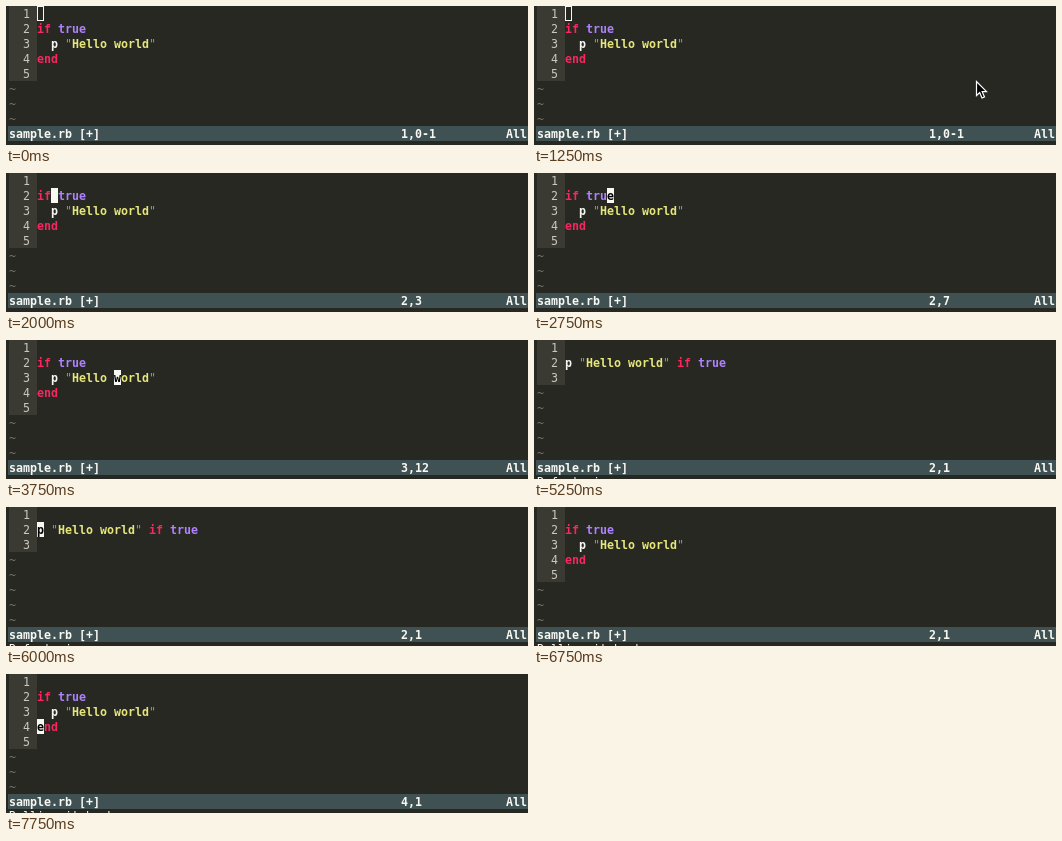
Animation of 522x139 px, one loop 8 s. Source, as an HTML page with a canvas:

```html
<!DOCTYPE html>
<html lang="en">
<head>
<meta charset="utf-8">
<title>Editor</title>
<style>
html, body { margin: 0; width: 100%; height: 100%; overflow: hidden; background: #272822; }
canvas { display: block; }
</style>
</head>
<body>
<canvas id="stage" width="522" height="139"></canvas>
<script>
const ctx = document.getElementById("stage").getContext("2d");
const LOOP = 8000, CELL = 7, ROW = 15, LEFT = 3, GUTTER = 4;
const BG = "#272822", WHITE = "#f8f8f2", PINK = "#f92660", PURPLE = "#ae81ff",
      YELLOW = "#e6e67a", GREY = "#98978c", DIM = "#74746a";

// Each line is a list of [text, colour, regular weight]
const string = [['"', GREY, true], ["Hello world", YELLOW], ['"', GREY, true]];
const block = [
  [],
  [["if", PINK], [" true", PURPLE]],
  [["  p ", WHITE], ...string],
  [["end", PINK]],
  []
];
const modifier = [
  [],
  [["p ", WHITE], ...string, [" if", PINK], [" true", PURPLE]],
  []
];

// Cursor steps: [start, line, column, style]
const steps = [
  [0, 1, 0, "hollow"], [1500, 1, 0], [1750, 2, 1], [2000, 2, 3], [2250, 2, 5],
  [2500, 2, 6], [2750, 2, 7], [3000, 3, 7], [3250, 3, 9], [3500, 3, 11],
  [3750, 3, 12], [4250, 3, 7], [4500, 2, 1], [5250, 2, 1, "off"], [5500, 2, 1],
  [6750, 2, 1, "off"], [7000, 2, 1], [7500, 3, 1], [7750, 4, 1]
];
const CONVERT = 4750, UNDO = 6250;

function rect(x, y, w, h, color) {
  ctx.fillStyle = color;
  ctx.fillRect(x, y, w, h);
}

function write(text, col, row, color, regular) {
  ctx.font = `${regular ? "" : "bold "}11.63px "DejaVu Sans Mono", monospace`;
  ctx.fillStyle = color;
  [...text].forEach((c, i) => ctx.fillText(c, LEFT + (col + i) * CELL, row * ROW + 12));
}

function drawLine(tokens, row) {
  write(String(row + 1).padStart(3), 0, row, "#c8c8bc", true);
  let col = GUTTER;
  for (const [text, color, regular] of tokens) {
    write(text, col, row, color, regular);
    col += text.length;
  }
}

function drawCursor(lines, line, column, style) {
  if (style === "off") return;
  const col = Math.max(column - 1, 0), row = line - 1;
  const x = LEFT + (GUTTER + col) * CELL, y = row * ROW;
  if (style === "hollow") {
    ctx.strokeStyle = WHITE;
    ctx.lineWidth = 1;
    ctx.strokeRect(x + 0.5, y + 0.5, CELL - 1, ROW - 1);
    return;
  }
  rect(x, y, CELL, ROW, WHITE);
  const text = lines[row].map(token => token[0]).join("");
  write(text[col] || "", GUTTER + col, row, "#000");
}

function drawPointer(time) {
  if (time < 1000 || time >= 1500) return;
  const away = Math.max(0, 1 - (time - 1000) / 250);
  ctx.save();
  ctx.translate(442.5 + 28 * away, 75.5 + 40 * away);
  const arrow = new Path2D("M0 0V14L3.2 11L5.5 16.5L8 15.4L5.7 10.2H10Z");
  ctx.fillStyle = "#000";
  ctx.strokeStyle = "#fff";
  ctx.lineWidth = 1.2;
  ctx.fill(arrow);
  ctx.stroke(arrow);
  ctx.restore();
}

function draw(time) {
  const converted = time >= CONVERT && time < UNDO;
  const lines = converted ? modifier : block;
  const [, line, column, style] = steps.findLast(step => step[0] <= time);

  rect(0, 0, 522, 139, BG);
  rect(LEFT, 0, GUTTER * CELL, lines.length * ROW, "#3b3a32");
  lines.forEach(drawLine);
  for (let row = lines.length; row < 8; row++) write("~", 0, row, DIM, true);
  drawCursor(lines, line, column, style);

  rect(2, 8 * ROW, 520, ROW, "#405153");
  write("sample.rb [+]", 0, 8, WHITE);
  write(column ? `${line},${column}` : `${line},0-1`, 56, 8, WHITE);
  write("All", 71, 8, WHITE);
  if (time >= CONVERT) write(converted ? "Refactoring" : "Rolling it back", 0, 8.93, WHITE, true);
  drawPointer(time);
}

function tick() {
  draw(Math.floor(performance.now() % LOOP / 250) * 250);
  requestAnimationFrame(tick);
}
tick();
</script>
</body>
</html>
```
